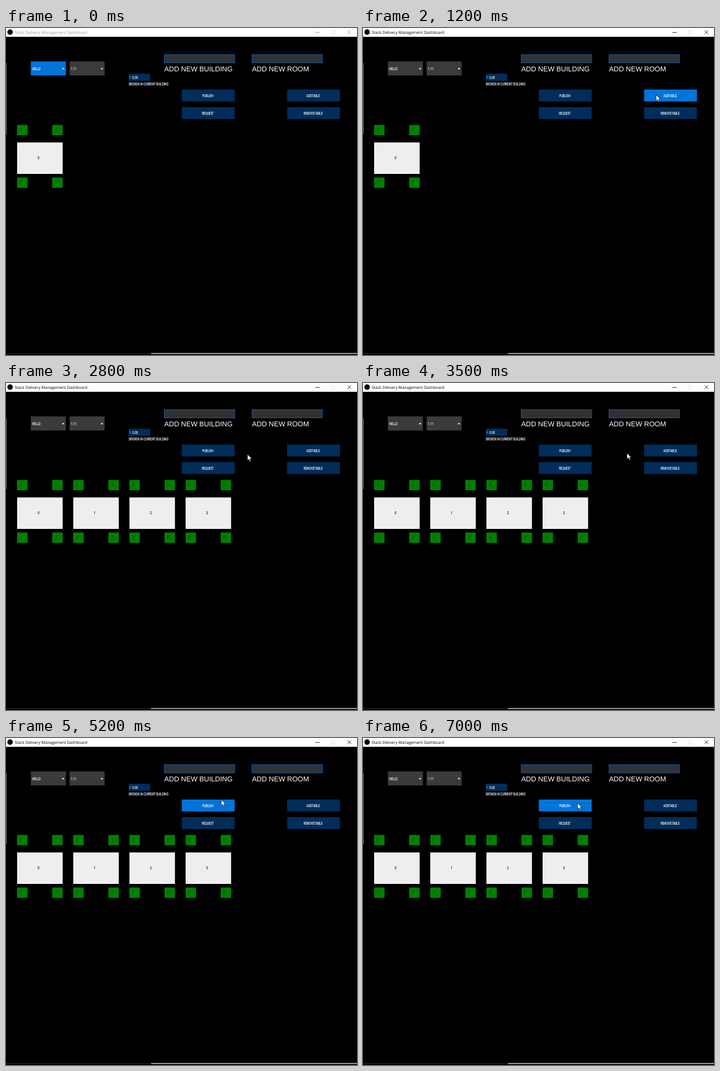
Recreate the animation shown at these times as an HTML page. Size 600 by 558 pixels, loop 7.2 s.

```html
<!DOCTYPE html>
<html lang="en">
<head>
<meta charset="utf-8">
<title>Dashboard</title>
<style>
html, body { margin: 0; height: 100%; overflow: hidden; background: #000; }
svg { display: block; width: 100vw; height: 100vh; }
text { text-rendering: geometricPrecision; }
.small { font: 500 7px Roboto, sans-serif; }
.label { font: 12px "Liberation Sans", Arial, sans-serif; fill: #fff; }
.title { font: 6.75px "Open Sans", sans-serif; }
</style>
</head>
<body>
<svg id="stage" viewBox="0 0 600 558"></svg>
<script>
const NAVY = '#002d5a', BLUE = '#0074d9', GREY = '#3c3a3c';
const LOOP = 7200, STEP = 100, TRAVEL = 500;
const stage = document.getElementById('stage');

function add(tag, attrs, parent = stage, content = '') {
  const el = document.createElementNS('http://www.w3.org/2000/svg', tag);
  for (const key in attrs) el.setAttribute(key, attrs[key]);
  el.textContent = content;
  return parent.appendChild(el);
}
const box = (x, y, width, height, fill, parent, more) =>
  add('rect', { x, y, width, height, fill, ...more }, parent);
const path = (d, more) => add('path', { d, ...more });

// Narrow interface lettering, the same condensing everywhere
const small = (str, x, y, anchor = 'start', fill = '#fff', parent = stage) =>
  add('text', { class: 'small', fill, 'text-anchor': anchor,
    transform: `translate(${x} ${y}) scale(.67 1)` }, parent, str);

// Title bar
box(0, 0, 600, 15, '#fff');
add('circle', { cx: 7, cy: 7, r: 4.7, fill: '#000' });
const title = add('text', { class: 'title', x: 15, y: 9.8 }, stage,
  'Stack Delivery Management Dashboard');
const controls = path('M529 7.5h7M584 4.2l6 6m0-6l-6 6', { fill: 'none', 'stroke-width': .8 });
path('M556.5 4.5h5.5v5.5h-5.5z', { fill: 'none', stroke: '#ddd', 'stroke-width': .7 });

// Window edges
box(0, 60, 1, 121, '#777');
box(0, 555, 248, 1, '#2a2a2a');
box(248, 554.7, 352, 1.5, '#ccc');

// Dropdowns
const dropdowns = ['HELLO', '1.11'].map((str, i) => {
  const x = 42.4 + 66.2 * i;
  const back = box(x, 57, 60, 24, GREY);
  small(str, x + 2.5, 71.5);
  path(`M${x + 53} 70.2l2.3-2.4 2.3 2.4z`, { fill: '#fff' });
  return back;
});

// Number box
box(210, 78, 36.5, 12, NAVY);
path('M211 81l3.2 3-3.2 3z', { fill: BLUE });
small('0.00', 216, 86.8);
small('BROKEN IN CURRENT BUILDING', 210, 97.5);

// Text fields
['ADD NEW BUILDING', 'ADD NEW ROOM'].forEach((str, i) => {
  const x = 270 + 150 * i;
  box(x + .5, 45.5, 120.5, 14, '#333132', stage, { stroke: '#0759a8' });
  add('text', { class: 'label', x: x + .6, y: 74 }, stage, str);
});

// Buttons, two columns of two
const buttons = ['PUBLISH', 'REQUEST', 'ADDTABLE', 'REMOVETABLE'].map((str, i) => {
  const x = 300.5 + 180 * (i >> 1), y = 105 + 30 * (i % 2);
  const back = box(x, y, 90.3, 20.3, NAVY);
  small(str, x + 44.5, y + 12.7, 'middle');
  return { x, y, back };
});

// Tables, each with four seats
const tables = Array.from({ length: 5 }, (_, i) => {
  const group = add('g', { transform: `translate(${19 + 96 * i} 0)` });
  box(0, 195.3, 77.8, 53.7, '#efedf0', group);
  small(i, 36.7, 223.8, 'middle', '#000', group);
  for (let s = 0; s < 4; s++) {
    const x = 60 * (s >> 1), y = 165.4 + 89.8 * (s % 2);
    box(x, y, 17.8, 17.6, '#008000', group);
    small(4 * i + s, x + 7, y + 10.6, 'middle', '#033a03', group);
  }
  return group;
});

const cursor = path('M0 0v10.5l2.4-2.2 1.7 3.9 1.7-.7-1.7-3.8h3.4z',
  { fill: '#fff', stroke: '#000', 'stroke-width': .7 });

// Where the pointer rests, and when it gets there
const stops = [
  { at: 100, x: 598, y: 300 },
  { at: 600, x: 510.7, y: 138.7 },
  { at: 1000, x: 501, y: 114 },
  { at: 3000, x: 365, y: 126 },
  { at: 3700, x: 498, y: 116 },
  { at: 4500, x: 473, y: 148 },
  { at: 4700, x: 493, y: 146 },
  { at: 5200, x: 368, y: 105.2 },
  { at: 5700, x: 366.7, y: 111 }
];
const added = [1300, 1600, 2100, 3900], removed = [4700];

const passed = (times, t) => times.filter(at => at <= t).length;
const smooth = k => k * k * (3 - 2 * k);

function pointer(t) {
  const next = stops.findIndex(stop => stop.at > t);
  if (next < 0) return stops.at(-1);
  const from = stops[next - 1], to = stops[next];
  if (!from) return { x: -50, y: -50 };
  const span = Math.min(TRAVEL, to.at - from.at);
  const k = smooth(Math.max(0, 1 - (to.at - t) / span));
  return { x: from.x + (to.x - from.x) * k, y: from.y + (to.y - from.y) * k };
}

function draw(ms) {
  const t = Math.floor(ms % LOOP / STEP) * STEP;
  const p = pointer(t);
  const ink = t < 1200 ? '#999' : '#000';
  const count = 1 + passed(added, t) - passed(removed, t);

  title.setAttribute('fill', ink);
  controls.setAttribute('stroke', ink);
  dropdowns[0].setAttribute('fill', t < stops[0].at ? BLUE : GREY);
  for (const { x, y, back } of buttons) {
    const over = p.x >= x && p.x < x + 90 && p.y >= y && p.y < y + 20;
    back.setAttribute('fill', over ? BLUE : NAVY);
  }
  tables.forEach((table, i) => table.setAttribute('visibility', i < count ? 'visible' : 'hidden'));
  cursor.setAttribute('transform', `translate(${p.x} ${p.y})`);
}

const start = performance.now();
function tick() {
  draw(performance.now() - start);
  requestAnimationFrame(tick);
}
tick();
</script>
</body>
</html>
```
